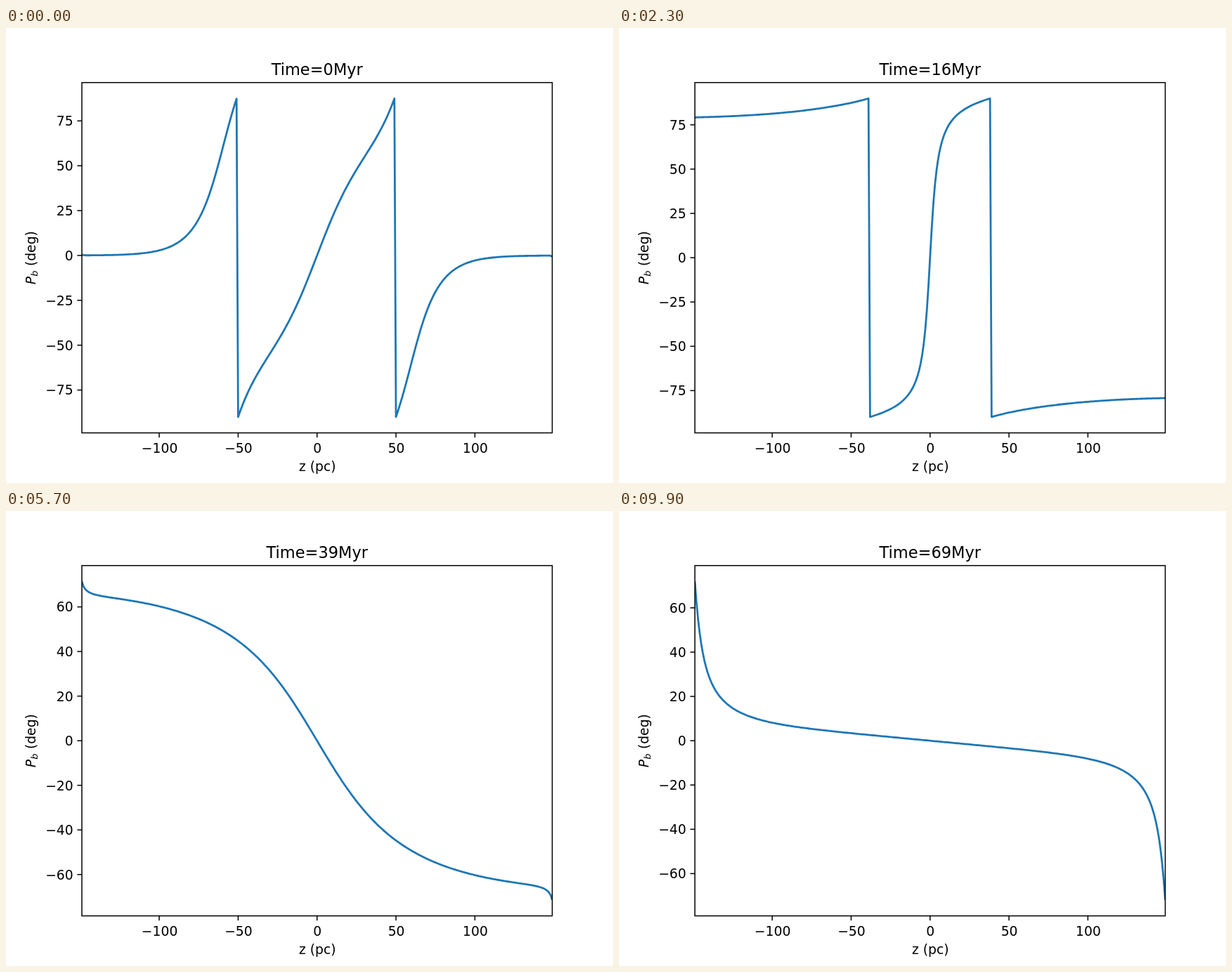
An HTML page with a canvas for the animation above (10 s loop, 864 by 648 pixels).

```html
<!DOCTYPE html>
<html>
<head>
<meta charset="utf-8">
<style>
html, body { margin: 0; width: 100%; height: 100%; overflow: hidden; background: #fff; }
canvas { display: block; }
</style>
</head>
<body>
<canvas id="stage" width="864" height="648"></canvas>
<script>
const ctx = document.getElementById('stage').getContext('2d');
const LEFT = 108, RIGHT = 777.5, TOP = 77.7, BOTTOM = 576.6;
const MID = (LEFT + RIGHT) / 2, Z_MAX = 149, COUNT = 100, STEP_MS = 100;

// Key points of the field shape: core strength, its growth with z, edge strength
const TIMES = [16, 31, 47, 67, 84, 99];
const SOFT = 10;
const CORE = [-12.8, 4.25, 21.9, 104.5, 375, 865].map(v => Math.asinh(v / SOFT));
const GROWTH = [.00634, .00102, .00048, .0018, .0017, .0001].map(Math.log);
const EDGE = [0, 0, .72, 1.95, 3.08, 4.65];

// Smooth cubic through the points (xs, ys)
function curve(xs, ys, x) {
  const last = xs.length - 1;
  let i = 0;
  while (i < last - 1 && x >= xs[i + 1]) i++;
  const slope = k => {
    const a = Math.max(k - 1, 0), b = Math.min(k + 1, last);
    return (ys[b] - ys[a]) / (xs[b] - xs[a]);
  };
  const h = xs[i + 1] - xs[i], s = (x - xs[i]) / h, r = 1 - s;
  return ys[i] * r * r * (1 + 2 * s) + ys[i + 1] * s * s * (3 - 2 * s) +
    h * s * r * (slope(i) * r - slope(i + 1) * s);
}

// Unit vector whose tangent is d / x plus a steep rise near the boundary
function vector(d, x, edge, n) {
  const gap = 150.6 - d, decay = .04 * Math.exp((47 - n) / 21);
  const y = d + x * edge / gap * Math.exp(-decay * gap ** 1.5);
  const r = Math.hypot(x, y);
  return [x / r, y / r];
}

const startField = d => vector(d, 25.5 * (Math.exp((d - 50) / 11.4) - 1), .03, 0);

function laterField(d, n) {
  const core = SOFT * Math.sinh(curve(TIMES, CORE, n));
  const growth = Math.exp(curve(TIMES, GROWTH, n));
  const edge = Math.max(0, curve(TIMES, EDGE, n));
  const bend = 3.4e-5 * Math.min(1, Math.max(0, (47 - n) / 16));
  return vector(d, core + growth * d * d / (1 + bend * d * d), edge, n);
}

// Field vector at distance d from the midplane
function field(d, n) {
  if (n >= TIMES[0]) return laterField(d, n);
  const s = n / TIMES[0], gain = s * (1 + d / Z_MAX);
  const a = startField(d), b = laterField(d, TIMES[0]);
  return [a[0] * (1 - s) + b[0] * gain, a[1] * (1 - s) + b[1] * gain];
}

function pitch(z, n) {
  if (!z) return 0;
  const [x, y] = field(Math.abs(z), n);
  return Math.atan(-Math.sign(z) * y / (x + z * 1e-9)) * 180 / Math.PI;
}

function text(str, x, y, align = 'center', size = 18.75, style = '') {
  ctx.font = `${style} ${size}px "DejaVu Sans", sans-serif`;
  ctx.textAlign = align;
  ctx.fillText(str, x, y);
}

function line(x1, y1, x2, y2) {
  ctx.beginPath();
  ctx.moveTo(x1, y1);
  ctx.lineTo(x2, y2);
  ctx.stroke();
}

const label = v => String(v).replace('-', '\u2212');
const xOf = z => MID + z * (RIGHT - LEFT) / 2 / Z_MAX;

function draw(n) {
  const values = [];
  for (let z = -Z_MAX; z <= Z_MAX; z++) values.push(pitch(z, n));
  const min = Math.min(...values), max = Math.max(...values);
  const pad = (max - min) * .05, low = min - pad, high = max + pad;
  const yOf = v => BOTTOM - (v - low) / (high - low) * (BOTTOM - TOP);

  ctx.fillStyle = '#fff';
  ctx.fillRect(0, 0, 864, 648);

  ctx.save();
  ctx.beginPath();
  ctx.rect(LEFT, TOP, RIGHT - LEFT, BOTTOM - TOP);
  ctx.clip();
  ctx.strokeStyle = '#1f77b4';
  ctx.lineWidth = 2.8;
  ctx.lineJoin = 'round';
  ctx.beginPath();
  values.forEach((v, i) => ctx.lineTo(xOf(i - Z_MAX), yOf(v)));
  ctx.stroke();
  ctx.restore();

  ctx.strokeStyle = ctx.fillStyle = '#000';
  ctx.lineWidth = 1.5;
  ctx.strokeRect(LEFT, TOP, RIGHT - LEFT, BOTTOM - TOP);
  for (let z = -100; z <= 100; z += 50) {
    line(xOf(z), BOTTOM, xOf(z), BOTTOM + 6.6);
    text(label(z), xOf(z) + .5, 604.6);
  }
  const step = (high - low) / 9 <= 20 ? 20 : 25;
  for (let v = Math.ceil(low / step) * step; v <= high; v += step) {
    const y = yOf(v);
    line(LEFT - 6.6, y, LEFT, y);
    text(label(v || 0), LEFT - 12.3, y + 6.9, 'right');
  }

  text(`Time=${Math.floor(n * 7 / 10)}Myr`, MID, 66.6, 'center', 22.5);
  text('z (pc)', MID + .5, 631.2);
  ctx.save();
  ctx.translate(42.3, (TOP + BOTTOM) / 2);
  ctx.rotate(-Math.PI / 2);
  text('P', -38, 0, 'left', 18.75, 'italic');
  text('b', -26.6, 3, 'left', 13.1, 'italic');
  text('(deg)', 38, 0, 'right');
  ctx.restore();
}

let shown = -1;
function tick() {
  const n = Math.floor(performance.now() / STEP_MS) % COUNT;
  if (n !== shown) draw(shown = n);
  requestAnimationFrame(tick);
}
tick();
</script>
</body>
</html>
```
